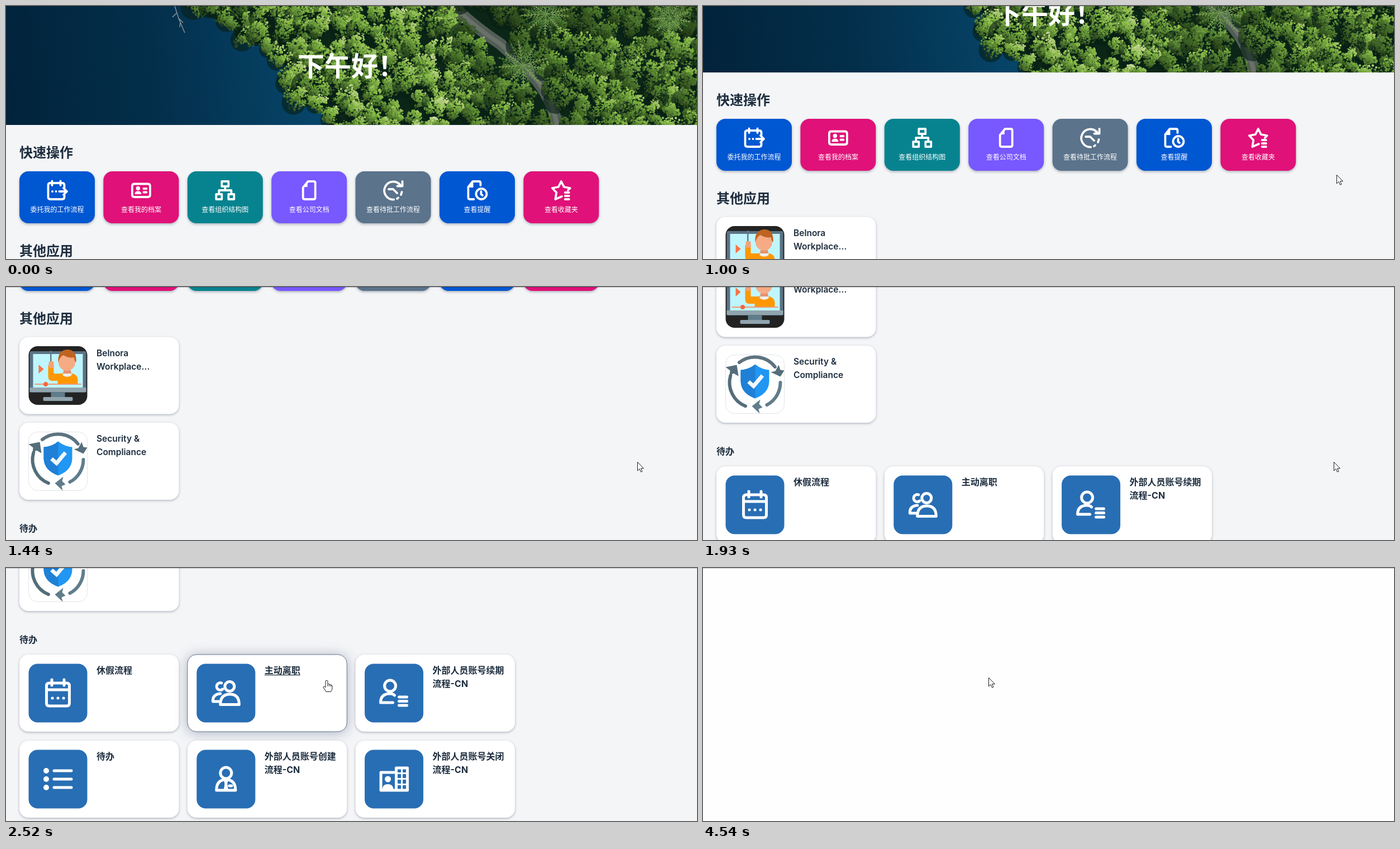
Recreate the animation shown at these times as an HTML page with a canvas. Size 1237 by 453 pixels, loop 5 s.

```html
<!DOCTYPE html>
<html lang="zh-CN">
<head>
<meta charset="utf-8">
<title>首页</title>
<style>
html, body { margin: 0; width: 100%; height: 100%; overflow: hidden; background: #f4f5f7; }
canvas { display: block; }
</style>
</head>
<body>
<canvas id="stage" width="1237" height="453"></canvas>
<script>
const W = 1237, H = 453, LOOP = 5000, HERO_H = 213;
const INK = '#1d2d3e';
const CJK = '"Noto Sans CJK SC", "Noto Sans CJK", sans-serif';
const LATIN = 'Inter, "Noto Sans", ' + CJK;
const ctx = document.getElementById('stage').getContext('2d');

// Bursts of motion: start, end, number of steps; the picture holds in between.
const BURSTS = [[0, 0, 1], [70, 530, 7], [600, 600, 1], [1000, 1510, 9], [1580, 1710, 3],
  [1930, 2450, 9], [2520, 2800, 5], [3090, 3400, 6], [4410, 4540, 3]];
const SCROLL = [[530, 0], [600, 7], [1000, 94], [1440, 380], [1510, 400], [1580, 420],
  [1710, 500], [1930, 520], [2060, 600], [2255, 686]];
const POINTER_X = [[70, 1121], [300, 1132], [530, 1134], [1000, 1134], [1440, 1130], [1930, 1129],
  [2125, 1129], [2450, 586], [2520, 574], [2800, 494], [4345, 494], [4540, 511]];
const POINTER_Y = [[70, 340], [300, 312], [530, 291], [600, 302], [1000, 302], [1440, 313],
  [2125, 313], [2450, 213], [2520, 201], [2800, 183], [4345, 183], [4540, 196]];
const FADE = [[3028, 0], [3400, 1]];

function hold(t) {
  const [a, b, n] = BURSTS.filter(s => t >= s[0]).pop();
  if (n === 1) return a;
  const step = (b - a) / (n - 1);
  return a + step * Math.min(n - 1, Math.floor((t - a) / step + 0.15));
}

function track(keys, t) {
  if (t <= keys[0][0]) return keys[0][1];
  for (let i = 1; i < keys.length; i++) {
    const [t0, v0] = keys[i - 1], [t1, v1] = keys[i];
    if (t <= t1) return v0 + (v1 - v0) * (t - t0) / (t1 - t0);
  }
  return keys[keys.length - 1][1];
}

function seeded(seed) {
  return () => {
    seed = (seed + 0x6D2B79F5) | 0;
    let v = Math.imul(seed ^ (seed >>> 15), 1 | seed);
    v = (v + Math.imul(v ^ (v >>> 7), 61 | v)) ^ v;
    return ((v ^ (v >>> 14)) >>> 0) / 4294967296;
  };
}

// ---- hero: lake and forest from above ----
const SHORE = [[0, 300], [18, 345], [35, 387], [62, 398], [74, 462], [100, 470], [112, 500],
  [122, 482], [150, 488], [176, 512], [184, 546], [213, 560]];
const ROAD = new Path2D('M795 -5Q835 35 885 68Q945 120 965 155Q982 185 988 220');

function paintHero() {
  const cv = document.createElement('canvas');
  cv.width = W;
  cv.height = HERO_H;
  const h = cv.getContext('2d'), rnd = seeded(41);

  const water = h.createLinearGradient(0, 170, 540, 110);
  water.addColorStop(0, '#02233b');
  water.addColorStop(0.5, '#032f4b');
  water.addColorStop(1, '#064468');
  h.fillStyle = water;
  h.fillRect(0, 0, W, HERO_H);

  h.fillStyle = '#0b2617';
  h.beginPath();
  h.moveTo(W, 0);
  SHORE.forEach(([y, x]) => h.lineTo(x + 16, y));
  h.lineTo(W, HERO_H);
  h.fill();

  h.lineWidth = 21;
  h.strokeStyle = '#515c55';
  h.stroke(ROAD);
  h.lineWidth = 8;
  h.strokeStyle = '#687069';
  h.stroke(ROAD);

  // A point in a disc with how strongly it faces the light.
  const scatter = r => {
    const a = rnd() * 6.283, d = Math.sqrt(rnd()) * r;
    const dx = Math.cos(a) * d, dy = Math.sin(a) * d;
    return { dx, dy, lit: (dx * 0.5 - dy * 0.75) / r };
  };
  const tree = (x, y, r, tone) => {
    h.fillStyle = 'rgba(7,30,20,.6)';
    h.beginPath();
    h.arc(x - r * 0.25, y + r * 0.3, r * 0.9, 0, 7);
    h.fill();
    for (let i = 0; i < 15; i++) {
      const tuft = scatter(r * 0.8);
      for (let j = 0; j < 16; j++) {
        const leaf = scatter(r * 0.36);
        const light = 7 + tone * (31 + 18 * tuft.lit + 13 * leaf.lit + 14 * rnd());
        h.fillStyle = `hsl(${101 - light * 0.38 + rnd() * 8},${38 + rnd() * 14}%,${light}%)`;
        h.beginPath();
        h.arc(x + tuft.dx + leaf.dx, y + tuft.dy + leaf.dy, 0.7 + rnd() * 1.5, 0, 7);
        h.fill();
      }
    }
  };
  for (let gy = -6; gy < 235; gy += 25) {
    for (let gx = 300; gx < 1260; gx += 33) {
      const x = gx + rnd() * 26 - 13, y = gy + rnd() * 20 - 10, r = 16 + rnd() * 11;
      const nearRoad = Math.abs(x - (830 + y * 0.75)) < 75;
      let tone = 0.6 + 0.5 * rnd();
      if (x < 800) tone = Math.max(tone, 0.85);
      else if (y < 50) tone *= 0.5;
      else if (nearRoad) tone *= 0.65;
      else tone *= 0.85;
      h.lineWidth = 14 + r;
      if (x < track(SHORE, y) + r * 0.55 || h.isPointInStroke(ROAD, x, y)) continue;
      tree(x, y, r, tone);
    }
  }

  const pine = (x, y, r) => {
    for (let i = 0; i < 17; i++) {
      const a = i * 0.37 + rnd() * 0.2, len = r * (0.7 + rnd() * 0.3);
      const ux = Math.cos(a), uy = Math.sin(a);
      h.strokeStyle = i % 2 ? '#4c7a3a' : '#7a9f55';
      h.lineWidth = 1.3;
      h.beginPath();
      h.moveTo(x, y);
      h.lineTo(x + ux * len, y + uy * len);
      for (let d = 0.25; d < 1; d += 0.13) {
        const px = x + ux * len * d, py = y + uy * len * d, k = 6 * (1.2 - d);
        h.moveTo(px + (ux - uy) * k, py + (uy + ux) * k);
        h.lineTo(px, py);
        h.lineTo(px + (ux + uy) * k, py + (uy - ux) * k);
      }
      h.stroke();
    }
  };
  pine(925, 106, 50);
  pine(966, 14, 46);
  pine(1188, 22, 40);

  h.strokeStyle = '#9a9d97';
  h.lineWidth = 1.3;
  h.stroke(new Path2D('M302 0L309 22L320 48M309 22L317 30M306 12L298 20M312 30L311 38'));
  return cv;
}

// ---- icons, centred on the origin; s: stroked, f: filled ----
const icon = (s, f = '') => ({ s: new Path2D(s), f: new Path2D(f) });
const ring = (x, y, r) => `M${x - r} ${y}a${r} ${r} 0 1 1 ${2 * r} 0a${r} ${r} 0 1 1 ${-2 * r} 0Z`;
const box = (x, y, w, h) => `M${x} ${y}h${w}v${h}h${-w}Z`;
const rbox = (x, y, w, h, r) => `M${x + r} ${y}h${w - 2 * r}q${r} 0 ${r} ${r}v${h - 2 * r}q0 ${r} ${-r} ${r}` +
  `h${2 * r - w}q${-r} 0 ${-r} ${-r}v${2 * r - h}q0 ${-r} ${r} ${-r}Z`;

const TILES = [
  ['#0057d2', '委托我的工作流程', icon('M13 -5V-9Q13 -13 9 -13H-12Q-16 -13 -16 -9V12Q-16 16 -12 16H9Q13 16 13 12V9' +
    'M-9 -16.5V-9M6 -16.5V-9M4 2H16M11.5 -4L17.5 2L11.5 8M-8.5 2h.1M-2 2h.1')],
  ['#e01178', '查看我的档案', icon(rbox(-16, -11.5, 32, 23.5, 4) + 'M4.5 -3H9.5M4.5 3.5H9.5',
    ring(-5.5, -3.5, 3.7) + 'M-11.5 7Q-11.5 1.5 -5.5 1.5Q.5 1.5 .5 7Z')],
  ['#07838f', '查看组织结构图', icon(box(-6, -16, 12, 9) + box(-16, 7, 10, 9) + box(6, 7, 10, 9) +
    'M0 -7V0M-11 7V0H11V7')],
  ['#7858ff', '查看公司文档', icon('M-11 -5L-2 -16H8Q11 -16 11 -13V13Q11 16 8 16H-8Q-11 16 -11 13Z', 'M-11 -6L-3 -16V-6Z')],
  ['#5b738b', '查看待批工作流程', icon('M1 16.5A16 16 0 1 1 13 -9M16.5 -16V-7.5H7.5M-8 -2H0L7 5' +
    'M7 15L9 13.5M14 8L15.5 3')],
  ['#0057d2', '查看提醒', icon('M-6 16H-13Q-16 16 -16 13V-6L-8 -16H3Q6 -16 6 -13V-9' + ring(7.5, 6.5, 9.5) +
    'M7 2V7L9.5 9', 'M-16 -5L-7 -16V-5Z')],
  ['#e01178', '查看收藏夹', icon('M1 11L-10.5 16L-8.5 4L-16 -4L-5 -6L0 -16L5 -6L16 -4L12 0M7 4H14M7 10H14M7 16H14')]
];

const CARDS = [
  { col: 0, y: 471.5, text: ['Belnora', 'Workplace...'], art: drawLesson },
  { col: 0, y: 625, text: ['Security &', 'Compliance'], art: drawShield },
  { col: 0, y: 841, text: ['休假流程'], icon: icon(rbox(-20.5, -18, 41, 41, 5) +
    'M-11 -24V-14M11 -24V-14M-20 -6H20M-10 9h.1M0 9h.1M10 9h.1') },
  { col: 1, y: 841, text: ['主动离职'], icon: icon('M-2 -12a8.5 8.5 0 1 1 17 0a8.5 8.5 0 1 1 -17 0Z' +
    'M-10 20.5Q-10 2 7 2Q23.5 2 23.5 20.5ZM-6 -7A6.5 6.5 0 1 1 -8 -18M-13 15H-23.5Q-24 2 -10 1') },
  { col: 2, y: 841, text: ['外部人员账号续期', '流程-CN'], icon: icon(ring(-7, -13, 10) +
    'M-2 17H-24Q-24 1 -7 1Q-2 1 1 4M9 7H23M9 14.5H23M9 22H23') },
  { col: 0, y: 995, text: ['待办'], icon: icon('M-7 -15H24M-7 0H24M-7 15H24',
    ring(-21, -15, 5) + ring(-21, 0, 5) + ring(-21, 15, 5)) },
  { col: 1, y: 995, text: ['外部人员账号创建', '流程-CN'], icon: icon(ring(0, -11, 10) +
    'M-17 20Q-17 1 0 1Q17 1 17 20ZM0 5V20M6 12h4', 'M-4 3H4L2 8L4 18H-4L-2 8Z') },
  { col: 2, y: 995, text: ['外部人员账号关闭', '流程-CN'], icon: icon('M0 -12H-23.5V20H24V-20H4V20',
    ring(-11, 0, 5.5) + 'M-21 20Q-21 9 -11 9Q-1 9 -1 20Z' + box(12.5, -20, 3, 40) +
    box(5, -12, 18, 3) + box(5, -2, 18, 3) + box(5, 8, 18, 3)) }
];

function drawIcon(ic, x, y, weight) {
  ctx.save();
  ctx.translate(x, y);
  ctx.strokeStyle = ctx.fillStyle = '#fff';
  ctx.lineWidth = weight;
  ctx.lineCap = ctx.lineJoin = 'round';
  ctx.stroke(ic.s);
  ctx.fill(ic.f);
  ctx.restore();
}

function panel(x, y, w, h, r, fill) {
  ctx.beginPath();
  ctx.roundRect(x, y, w, h, r);
  ctx.fillStyle = fill;
  ctx.fill();
}

function shadow(blur, dy, color) {
  ctx.shadowBlur = blur;
  ctx.shadowOffsetY = dy;
  ctx.shadowColor = color;
}

function shape(d, fill) {
  ctx.fillStyle = fill;
  ctx.fill(new Path2D(d));
}

function line(d, color, weight) {
  ctx.strokeStyle = color;
  ctx.lineWidth = weight;
  ctx.stroke(new Path2D(d));
}

function write(text, x, y, font, color = INK, align = 'left') {
  ctx.font = font;
  ctx.fillStyle = color;
  ctx.textAlign = align;
  ctx.fillText(text, x, y);
}

// Artwork in a 105 px square.
function drawLesson() {
  panel(0, 0, 105, 105, 16, '#232323');
  shape(rbox(2, 9, 101, 74, 3), '#5c7385');
  shape(box(2, 74, 101, 8), '#90a4ae');
  shape(box(8, 14, 89, 60), '#bff6fe');
  shape(box(40, 83, 25, 9), '#607d8b');
  shape(rbox(26, 91, 53, 7, 2), '#90a4ae');
  shape('M18 33L27 41L18 49Z', '#ff7043');
  line('M11 68H94', '#ef9a78', 2);
  shape(box(38.5, 8, 2.5, 22), '#607d8b');
  shape('M35 34H45V49H58Q63 47 69 48Q87 48 88 59V67H52V62H42Q35 62 35 54Z', '#ff9800');
  shape(rbox(36, 27, 9, 12, 3), '#f2a27c');
  shape(rbox(62, 42, 14, 11, 4), '#e8916c');
  shape('M61 49H77V52Q69 58 61 52Z', '#eceff1');
  shape(ring(68.5, 29, 15), '#f6ab84');
  shape('M53 29Q51 7 70 6Q87 7 85 29Q82 27 81 20Q73 22 62 16Q56 19 53 29Z', '#bf6420');
  shape(ring(30.5, 68, 4), '#f4683c');
}

function drawShield() {
  panel(0, 0, 105, 105, 16, '#fff');
  ctx.strokeStyle = '#e1e3e5';
  ctx.lineWidth = 1;
  ctx.stroke();
  ctx.save();
  ctx.clip();
  ctx.lineCap = 'round';
  [[232, 322, '#5d737f'], [0, 62, '#607d8b'], [112, 196, '#546e7a']].forEach(([a, b, color]) => {
    ctx.beginPath();
    ctx.arc(52.5, 49.5, 45.5, a * Math.PI / 180, b * Math.PI / 180);
    ctx.strokeStyle = color;
    ctx.lineWidth = 6;
    ctx.stroke();
  });
  ctx.restore();
  shape('M81 31L89 29L95 18L98 27L105 28L98 39Z', '#546e7a');
  shape('M0 22L20 18L23 38L14 33L7 38L8 28Z', '#546e7a');
  shape('M47 92L62 80L60 88L66 94L59 97L61 105Z', '#607d8b');
  shape('M53 17Q64 26 78 27V48Q77 69 53 78Q28 69 27 48V27Q42 26 53 17Z', '#2196f3');
  shape('M53 17V78Q28 69 27 48V27Q42 26 53 17Z', '#1f80d6');
  ctx.lineJoin = 'miter';
  line('M41 48L50 56L66 37', '#f2f6f9', 7);
}

function drawTile([color, label, ic], i) {
  const x = 24 + 150.4 * i;
  ctx.save();
  shadow(4, 2, 'rgba(34,53,72,.35)');
  panel(x, 296, 135, 93, 16, color);
  ctx.restore();
  drawIcon(ic, x + 67.5, 330, 3.8);
  write(label, x + 67.5, 369, '12px ' + CJK, '#fff', 'center');
}

const cardX = card => 24 + 300.8 * card.col;

function drawCard(card, hover) {
  const x = cardX(card), y = card.y;
  ctx.save();
  if (hover) shadow(22, 2, 'rgba(70,90,125,.45)');
  else shadow(4, 1.5, 'rgba(34,53,72,.34)');
  panel(x, y, 285.5, 138, 16, '#fff');
  ctx.restore();
  if (hover) {
    ctx.strokeStyle = '#67738a';
    ctx.lineWidth = 1;
    ctx.stroke();
  }

  ctx.save();
  ctx.translate(x + 16.5, y + 16.5);
  if (card.art) card.art();
  else {
    panel(0, 0, 105, 105, 16, '#286eb4');
    drawIcon(card.icon, 52.5, 52.5, 5);
  }
  ctx.restore();

  card.text.forEach((text, i) => {
    const font = card.art ? '600 15.5px ' + LATIN : 'bold 16px ' + LATIN;
    const base = y + 34 + 24 * i;
    write(text, x + 138, base, font);
    if (hover) ctx.fillRect(x + 138, base + 2, ctx.measureText(text).width, 1.2);
  });
}

const ARROW = new Path2D('M.5 .5V16L4 12.6L6.6 18.2L9 17.1L6.5 11.8H11.5Z');
const HAND = new Path2D('M-2 1.8Q-2 .3 0 .3Q2 .3 2 1.8V7Q3.5 6 5 7.3Q7 6.6 7.6 8.5Q10 8 10 10.8V14' +
  'Q10 17 7.5 20.5H-1Q-2.5 17.5 -6 12.8Q-6.2 10.6 -4.2 11L-2 13ZM2 7V11M5 7.5V11M7.6 8.5V11.5');

function drawPointer(x, y, hand) {
  const path = hand ? HAND : ARROW;
  ctx.save();
  ctx.translate(x, y);
  ctx.fillStyle = '#fff';
  ctx.fill(path);
  ctx.strokeStyle = '#1c1c1c';
  ctx.lineWidth = 1;
  ctx.lineJoin = 'round';
  ctx.stroke(path);
  ctx.restore();
}

const hero = paintHero();

function draw(now) {
  const t = hold(now % LOOP);
  const scroll = Math.round(track(SCROLL, t));
  const px = Math.round(track(POINTER_X, t)), py = Math.round(track(POINTER_Y, t));
  const fade = track(FADE, t);
  const hovered = CARDS.find(c => px > cardX(c) && px < cardX(c) + 285 &&
    py + scroll > c.y && py + scroll < c.y + 138);

  ctx.fillStyle = '#f4f5f7';
  ctx.fillRect(0, 0, W, H);
  ctx.save();
  ctx.translate(0, -scroll);
  ctx.drawImage(hero, 0, 0);
  write('下午好！', 522, 125, '900 48px ' + CJK, '#fff');
  write('快速操作', 24, 271, 'bold 24px ' + CJK);
  TILES.forEach(drawTile);
  write('其他应用', 24, 447, 'bold 24px ' + CJK);
  write('待办', 24, 820, 'bold 16px ' + CJK);
  CARDS.forEach(c => drawCard(c, c === hovered));
  ctx.restore();

  if (fade > 0) {
    ctx.globalAlpha = fade;
    ctx.fillStyle = '#fefefe';
    ctx.fillRect(0, 0, W, H);
    ctx.globalAlpha = 1;
  }
  ctx.fillStyle = 'rgba(0,0,0,.22)';
  ctx.fillRect(0, 0, W, 1);
  if (t >= 70) drawPointer(px, py, hovered && fade < 0.6);
}

const start = performance.now();
function tick() {
  draw(performance.now() - start);
  requestAnimationFrame(tick);
}
tick();
</script>
</body>
</html>
```
